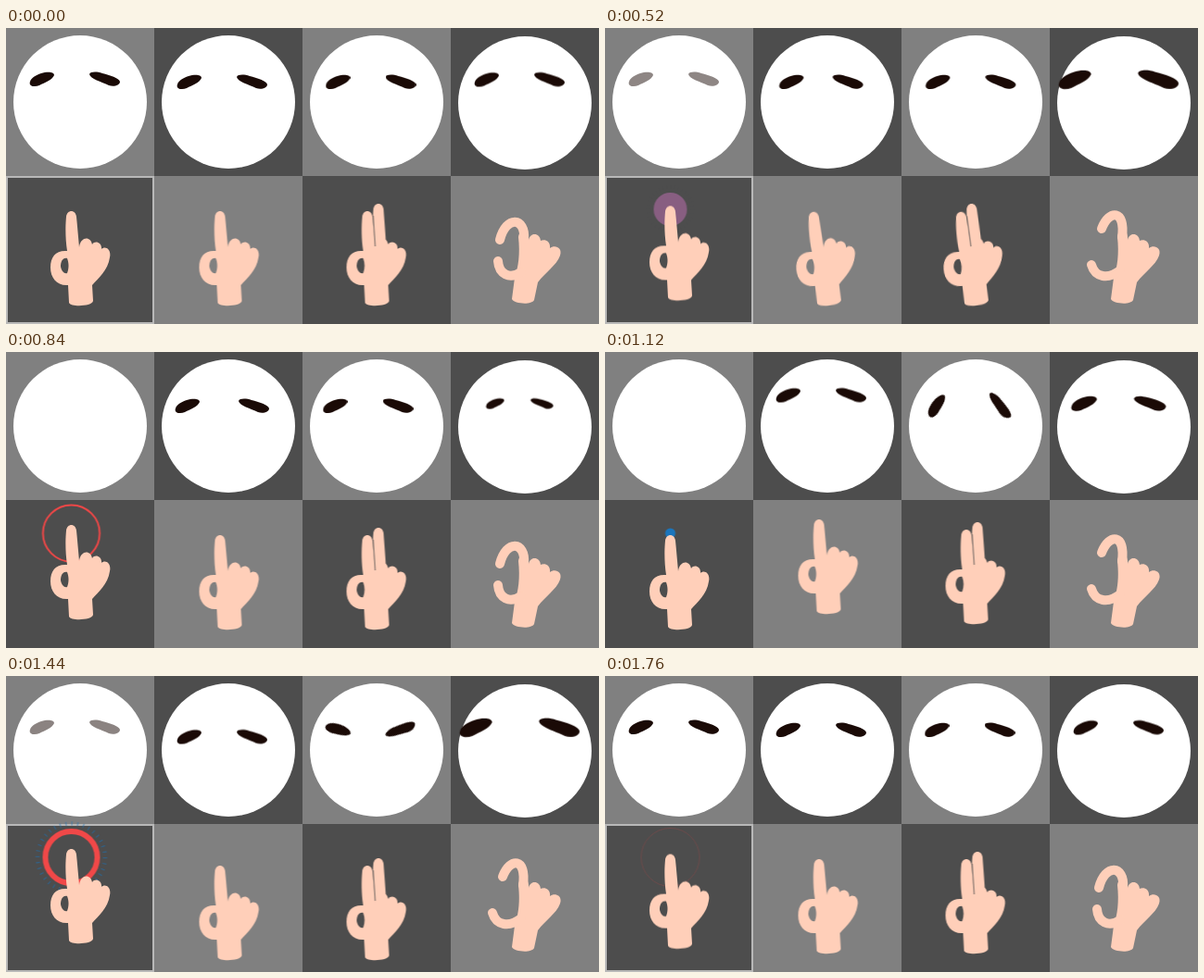
Recreate the animation shown at these times as an HTML page without scripts. Size 640 by 320 pixels, loop 1800 ms.

```html
<!DOCTYPE html>
<html lang="en">
<head>
<meta charset="utf-8">
<title>Gestures</title>
<style>
  html, body { margin: 0; width: 100%; height: 100%; overflow: hidden; background: #4d4d4d; }
  svg { display: block; width: 640px; height: 320px; }

  .skin { fill: #ffcfb9; fill-rule: evenodd; }
  .finger { fill: none; stroke: #ffcfb9; stroke-width: 10; stroke-linecap: round; }
  .gap { fill: none; stroke: #4d4d4d; stroke-width: .8; }
  .brow { fill: #1a0a06; }
  .left { --side: 1; }
  .right { --side: -1; }

  [class*="move-"] { animation: 1800ms ease-in-out infinite; }
  .pivot { transform-origin: 79.5px 290px; }
  .centred { transform-box: fill-box; transform-origin: center; }

  /* Tap */
  .move-frame { animation-name: frame; animation-timing-function: step-end; }
  .move-fade { animation-name: fade; animation-timing-function: linear; }
  .move-tap { animation-name: tap; animation-timing-function: linear; }
  .move-ring { animation-name: ring; animation-timing-function: linear; fill: none; }
  .move-ticks { animation-name: ticks; animation-timing-function: linear; fill: none;
    stroke: #1b75bc; stroke-width: 4.5; stroke-dasharray: .2 .8; }
  .second { animation-delay: -1080ms; }

  @keyframes frame { 0% { opacity: 1 } 31.1% { opacity: 0 } 73.3%, 100% { opacity: 1 } }
  @keyframes fade {
    0%, 23.3% { opacity: 1 }
    34.4%, 73.3% { opacity: 0 }
    80% { opacity: .5 }
    86.7%, 100% { opacity: 1 }
  }
  @keyframes tap {
    0%, 24.4% { transform: none }
    33.3%, 55.6% { transform: translateY(-11px) }
    60%, 64.4% { transform: none }
    73.3%, 95.6% { transform: translateY(-11px) }
    100% { transform: none }
  }
  @keyframes ring {
    0%, 15.5% { r: 0; stroke-width: 0; stroke: #1b75bc; opacity: 1 }
    17.8% { r: 1.5px; stroke-width: 3 }
    22.2% { r: 2.7px; stroke-width: 5.4 }
    26.7% { stroke: #1b75bc }
    31.1% { r: 11px; stroke-width: 22; stroke: #f04848 }
    33.3% { r: 16px; stroke-width: 19 }
    37.8% { r: 24.4px; stroke-width: 10.2 }
    40% { r: 28px; stroke-width: 6 }
    46.7% { r: 30.6px; stroke-width: 2; opacity: 1 }
    57.8% { r: 31.5px; stroke-width: 1; opacity: .2 }
    60%, 100% { r: 31.5px; stroke-width: 0; stroke: #f04848; opacity: 0 }
  }
  @keyframes ticks {
    0%, 28.9% { r: 24px; opacity: 0 }
    33.3% { r: 33px; opacity: .8 }
    37.8% { r: 36px; opacity: .7 }
    40% { r: 36.4px; opacity: .5 }
    44.4%, 100% { r: 37px; opacity: 0 }
  }

  /* One-finger swipe */
  .move-swipe { animation-name: swipe; }
  .move-spread { animation-name: spread; }
  @keyframes swipe {
    0%, 6.7% { transform: none }
    18.9% { transform: rotate(13deg) }
    36.7% { transform: rotate(-14.5deg) }
    46.7%, 50% { transform: none }
    62.2% { transform: translateY(-17px) }
    80% { transform: translateY(7px) }
    83.3% { transform: translateY(8px) }
    93.3%, 100% { transform: none }
  }
  @keyframes spread {
    0%, 6.7% { transform: none }
    17.8%, 20% { transform: translateX(calc(12px * var(--side))) }
    37.8% { transform: translateX(calc(-5px * var(--side))) }
    46.7% { transform: translateX(calc(-2px * var(--side))) }
    53.3% { transform: none }
    62.2% { transform: translateY(-11.5px) }
    66.7% { transform: translateY(-17px) }
    80% { transform: translateY(7.5px) }
    83.3% { transform: translateY(9px) }
    95.6%, 100% { transform: none }
  }

  /* Two-finger swipe */
  .move-swipe-two { animation-name: swipe-two; }
  .move-turn { animation-name: turn; }
  @keyframes swipe-two {
    0%, 6.7% { transform: none }
    18.9% { transform: rotate(13deg) }
    36.7% { transform: rotate(-14.5deg) }
    46.7%, 52% { transform: none }
    62.2% { transform: translateY(-6px) }
    80% { transform: translateY(7px) }
    83.3% { transform: translateY(8px) }
    93.3%, 100% { transform: none }
  }
  @keyframes turn {
    0%, 6.7% { transform: none }
    17.8%, 20% { transform: translateX(15px) }
    37.8% { transform: translateX(-13px) }
    46.7% { transform: translateX(-3px) }
    51% { transform: none }
    62.2% { transform: rotate(calc(-34deg * var(--side))) }
    65% { transform: rotate(calc(-37deg * var(--side))) }
    80% { transform: rotate(calc(38deg * var(--side))) }
    95%, 100% { transform: none }
  }

  /* Pinch */
  .move-zoom { animation-name: zoom; }
  .move-index { animation-name: index; }
  .move-thumb { animation-name: thumb; }
  @keyframes zoom {
    0%, 18.9% { transform: none }
    28.9%, 34.4% { transform: scale(1.33) }
    37.8% { transform: scale(1.05) }
    45%, 52% { transform: scale(.745) }
    62.2% { transform: scale(1.05) }
    68.9%, 81% { transform: scale(1.33) }
    95%, 100% { transform: none }
  }
  @keyframes index {
    0%, 20%, 45%, 55%, 93%, 100% { d: path("M559 228C561 205 540 202 533 229") }
    26%, 39%, 61%, 83% { d: path("M558 226C562 196 544 196 536 217") }
  }
  @keyframes thumb {
    0%, 20%, 45%, 55%, 93%, 100% { d: path("M531 252C532 266 543 272 556 264") }
    26%, 39%, 61%, 83% { d: path("M525 256C529 270 543 272 556 262") }
  }
</style>
</head>
<body>
<svg viewBox="0 0 640 320">
  <defs>
    <path id="brow-left" class="brow" d="M26 58C24 63 31 64 36 62C42 59 50 56 52 51C52 47 44 47 38 49C32 51 27 54 26 58Z"/>
    <path id="brow-right" class="brow" d="M90 50C91 47 98 47 104 49C112 51 122 54 123 58C123 62 116 64 111 62C103 58 91 55 90 50Z"/>
    <path id="hand" class="skin" d="M66 241C64 228 64 214 65 204C66 196 75 196 76 204C77 214 78 226 79 237C80 226 91 224 93 234C96 229 104 232 103 239C107 235 114 239 112 248C110 262 100 270 93 278L94 295C93 301 70 302 68 297L67 278C55 279 48 270 48 259C48 247 54 240 66 241ZM66 249C61 248 59 253 59 258C60 263 63 266 66 265C68 260 68 254 66 249Z"/>
  </defs>

  <rect width="640" height="320" fill="#4d4d4d"/>
  <path fill="#808080" d="M0 0h160v160h-160zM320 0h160v160h-160zM160 160h160v160h-160zM480 160h160v160h-160z"/>
  <g fill="#fff">
    <circle cx="80" cy="80" r="72"/>
    <circle cx="240" cy="80" r="72"/>
    <circle cx="400" cy="80" r="72"/>
    <circle cx="560" cy="81" r="72"/>
  </g>

  <g class="move-fade"><use href="#brow-left"/><use href="#brow-right"/></g>
  <rect class="move-frame" x="1" y="161" width="158" height="158" fill="none" stroke="#b8b8b8" stroke-width="2"/>
  <g transform="translate(70.5 196)">
    <circle class="move-ticks" r="0" pathLength="36"/>
    <circle class="move-ring" r="0"/>
    <circle class="move-ticks second" r="0" pathLength="36"/>
    <circle class="move-ring second" r="0"/>
  </g>
  <g class="move-tap"><use href="#hand"/></g>

  <g transform="translate(159 3)">
    <g class="move-spread left"><use href="#brow-left"/></g>
    <g class="move-spread right"><use href="#brow-right"/></g>
  </g>
  <g transform="translate(160.5 0)">
    <g class="move-swipe pivot"><use href="#hand"/></g>
  </g>

  <g transform="translate(319.5 3)">
    <g class="move-turn centred left"><use href="#brow-left"/></g>
    <g class="move-turn centred right"><use href="#brow-right"/></g>
  </g>
  <g transform="translate(319.5 0)">
    <g class="move-swipe-two pivot">
      <use href="#hand"/>
      <path class="skin" d="M79 240C77 222 76 205 77 196C78 188 87 188 88 196C89 210 90 222 91 240Z"/>
      <path class="gap" d="M76.8 203L79 236"/>
    </g>
  </g>

  <g transform="translate(480 .5)">
    <g class="move-zoom centred"><use href="#brow-left"/><use href="#brow-right"/></g>
  </g>
  <path class="skin" d="M553 226C555 214 565 216 564 229C566 221 576 221 577 230C580 228 588 229 587 238C592 234 601 237 598 246C594 257 582 264 574 275L570 294C567 300 548 298 546 293L549 270C553 258 555 245 553 226Z"/>
  <path class="finger move-index" d="M559 228C561 205 540 202 533 229"/>
  <path class="finger move-thumb" d="M531 252C532 266 543 272 556 264"/>
</svg>
</body>
</html>
```
